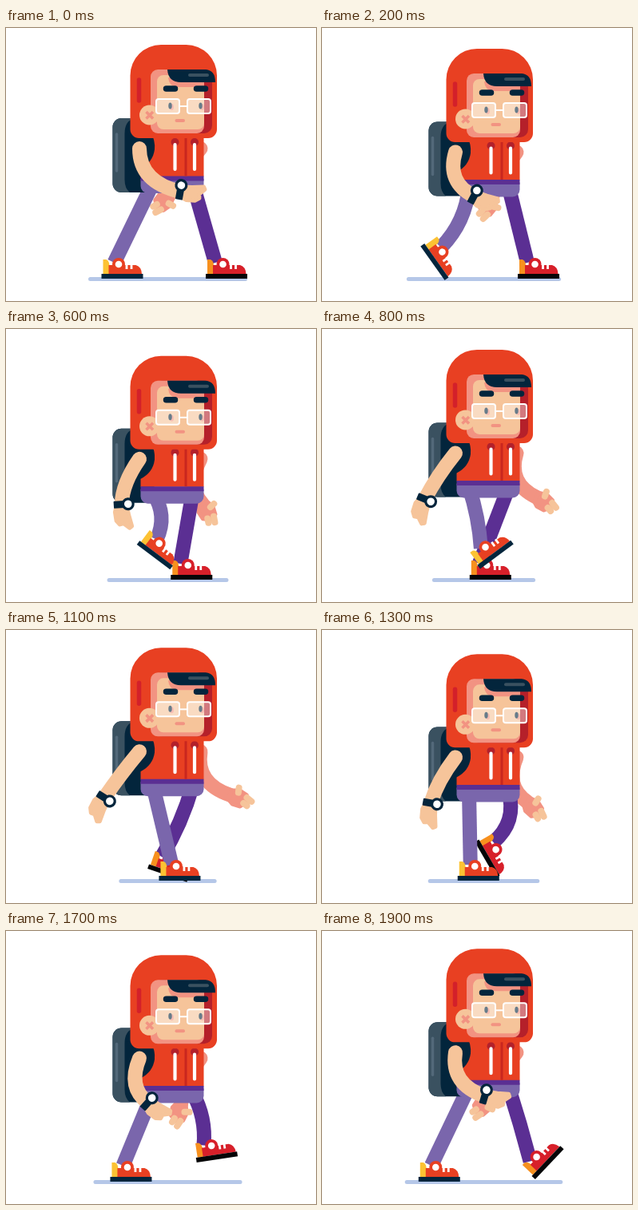
An HTML page for the animation above (2000 ms loop, 388 px wide and 342 px high).

```html
<!DOCTYPE html>
<html lang="en">
<head>
<meta charset="utf-8">
<title>Walk cycle</title>
<style>
  html, body { margin: 0; width: 100%; height: 100%; overflow: hidden; background: #fff; }
  svg { display: block; width: 100%; height: 100%; }
  .limb { fill: none; stroke-width: 18; }
  .round { stroke-linecap: round; stroke-linejoin: round; }
  .red { fill: #e84022; }
  .navy { fill: #03253c; }
  .slate { fill: #3a5160; }
  .skin { fill: #f6c49a; stroke: #f6c49a; }
  .blush { fill: #f29382; stroke: #f29382; }
  .flat { stroke: none; }
  .near { --upper: #e84022; --heel: #fcc233; --sole: #03253c; }
  .far { --upper: #d7202a; --heel: #f7901e; --sole: #050507; }
</style>
</head>
<body>
<svg viewBox="0 0 388 342">
  <defs>
    <g id="shoe">
      <path d="M2-6V-24H6Q10-22 10-16V-6Z" fill="var(--heel)"/>
      <path d="M9-6V-17H43Q50-15 50.500-6Z" fill="var(--upper)"/>
      <circle cx="21.500" cy="-18" r="8" fill="var(--upper)"/>
      <circle cx="21.500" cy="-18" r="4.300" fill="#fff"/>
      <path d="M31.500-18.500v6.500M37.500-18.500v6.500" stroke="#fff" stroke-width="2.800"/>
      <rect y="-6" width="52" height="6" fill="var(--sole)"/>
    </g>
  </defs>

  <line id="shadow" y1="314.500" y2="314.500" stroke="#b5c7e8" stroke-width="5" stroke-linecap="round"/>

  <path id="farArm" class="limb round" stroke="#f29382"/>
  <g id="farHand" stroke-width="5" class="round">
    <path class="blush" d="M0-6L10-9 20-6 22 3 16 10 6 10 0 6Z"/>
    <path class="skin" fill="none" d="M9-6L8-12M21-3L28 0M19 5L24 7" stroke-width="8"/>
  </g>

  <path id="farLeg" class="limb" stroke="#5b2f93"/>
  <use id="farShoe" class="far" href="#shoe"/>
  <path id="nearLeg" class="limb" stroke="#7a66ac"/>
  <use id="nearShoe" class="near" href="#shoe"/>

  <g id="body">
    <rect class="navy" x="133.500" y="113" width="52" height="93" rx="11"/>
    <path class="slate" d="M160 113Q148.500 117 148.500 132V190Q148.500 201 155 206H144.500A11 11 0 0 1 133.500 195V124A11 11 0 0 1 144.500 113Z"/>
    <path class="round" d="M138.500 133V179" stroke="#53697a" stroke-width="3.500"/>
    <path fill="#7a66ac" d="M168.500 189H247.500V198A9 9 0 0 1 238.500 207H177.500A9 9 0 0 1 168.500 198Z"/>
    <path class="red" d="M168.500 125H247.500V186H168.500Z"/>
    <path fill="#5b2f93" d="M168.500 185.500H247.500V191.500H168.500Z"/>
    <path d="M225 137V185.500" stroke="#c9261f" stroke-width="3"/>
    <g fill="#b3202b"><circle cx="211.500" cy="143" r="5"/><circle cx="236" cy="143" r="5"/></g>
    <path class="round" d="M211.500 146V177M236 146V177" stroke="#fff" stroke-width="4.200"/>
    <path class="navy" d="M150 130H181Q187 141 186 152Q184 168 168.500 176L150 180Z"/>
  </g>

  <g id="head">
    <path class="red" d="M155.500 59.500A38.500 38.500 0 0 1 194 21H225.500A38.500 38.500 0 0 1 264 59.500V127A11 11 0 0 1 253 138H166.500A11 11 0 0 1 155.500 127Z"/>
    <path class="round" d="M166.500 65V91" stroke="#d3202a" stroke-width="5.500"/>
    <rect x="185" y="52" width="73" height="80" rx="10" fill="#b5202a"/>
    <rect class="blush flat" x="181" y="52" width="67" height="80" rx="9"/>
    <rect class="skin flat" x="189" y="59" width="59" height="68" rx="8"/>
    <path class="blush flat" d="M203 62H248V74H214Q204 73 203 62Z"/>
    <path class="navy" d="M202 52H250Q262 53 262 68H219Q203 68 202 52Z"/>
    <path class="round" d="M230 59H252" stroke="#3a5160" stroke-width="4"/>
    <path class="round" d="M200.500 76H211.500M238.500 76H249.500" stroke="#03253c" stroke-width="7.500"/>
    <circle class="skin flat" cx="179.500" cy="109" r="12.500"/>
    <path d="M175.500 105l8.500 8.500m0-8.500l-8.500 8.500" stroke="#f29382" stroke-width="3.600"/>
    <g class="blush flat"><ellipse cx="207.500" cy="99" rx="2.500" ry="4"/><ellipse cx="245.500" cy="99" rx="2.500" ry="4"/></g>
    <g class="navy"><ellipse cx="205.500" cy="97.500" rx="2.200" ry="4"/><ellipse cx="243.500" cy="97.500" rx="2.200" ry="4"/></g>
    <g fill="#fff" fill-opacity=".4" stroke="#fff" stroke-width="2">
      <rect x="188" y="89" width="29" height="18" rx="3"/>
      <rect x="227" y="89" width="29" height="18" rx="3"/>
      <path d="M217 98H227"/>
    </g>
    <rect class="blush flat" x="211.500" y="114" width="12.500" height="4" rx="2"/>
  </g>

  <path id="nearArm" class="limb round" stroke="#f6c49a"/>
  <g id="nearHand">
    <path class="skin round" stroke-width="5" d="M0-6L14-8 28-11 30-8 24-1 25 4 20 8 9 9 0 6Z"/>
    <rect class="navy" x="-4.500" y="-9" width="9" height="19" rx="1"/>
    <circle class="navy" cy="-8" r="8"/>
    <circle cy="-8" r="4.800" fill="#fff"/>
  </g>
</svg>

<script>
const LOOP = 2000, STEP = 100, GROUND = 314;

// Front and back are the heel positions of a stride; lags shape its timing.
const LEGS = {
  near: { phase: .5, hip: 184, ankle: 16, front: 198, back: 119.5, lift: 62, kick: 84, stanceLag: .75, swingLag: 1.25 },
  far: { phase: 0, hip: 233.5, ankle: 12, front: 250, back: 175, lift: 53, kick: 67, stanceLag: 1.15, swingLag: 1 }
};
// Back is the wrist's rearmost offset from the shoulder.
const ARMS = {
  near: { phase: 0, shoulder: 167, back: -47, reach: 98 },
  far: { phase: .5, shoulder: 243.5, back: -39, reach: 89 }
};

const part = id => document.getElementById(id);
const mix = (a, b, u) => a + (b - a) * u;
const smooth = u => u * u * (3 - 2 * u);
// One hump over 0..1; a larger skew moves its peak later.
const hump = (u, skew) => Math.sin(Math.PI * u ** skew);

const place = (id, x, y, angle = 0) =>
  part(id).setAttribute('transform', `translate(${x} ${y}) rotate(${angle})`);
const curve = (id, x0, y0, x1, y1, x2, y2) =>
  part(id).setAttribute('d', `M${x0} ${y0}Q${x1} ${y1} ${x2} ${y2}`);

// Stance for half of the cycle, then a swing: toe kick, lift, heel strike.
function footPose(leg, cycle) {
  if (cycle < .5) {
    const slide = smooth((cycle * 2) ** leg.stanceLag);
    return { x: mix(leg.front, leg.back, slide), y: GROUND, angle: 0, bend: 0 };
  }
  const u = cycle * 2 - 1, raise = hump(u, .75) ** 2;
  return {
    x: mix(leg.back, leg.front, smooth(u ** leg.swingLag)) + 19 * hump(u, 7),
    y: GROUND - leg.lift * raise,
    angle: leg.kick * raise - 57 * hump(u, 4),
    bend: 23 * raise
  };
}

function drawLeg(side, cycle, sink) {
  const leg = LEGS[side], hipY = 194 + sink;
  const { x, y, angle, bend } = footPose(leg, (cycle + leg.phase) % 1);
  const r = angle * Math.PI / 180, cos = Math.cos(r), sin = Math.sin(r);
  const ankleX = x + leg.ankle * cos + 20 * sin, ankleY = y + leg.ankle * sin - 20 * cos;
  const dx = ankleX - leg.hip, dy = ankleY - hipY, len = Math.hypot(dx, dy);
  curve(side + 'Leg', leg.hip, hipY,
    leg.hip + dx / 2 + bend * dy / len, hipY + dy / 2 - bend * dx / len, ankleX, ankleY);
  place(side + 'Shoe', x, y, angle);
}

function drawArm(side, cycle, sink) {
  const { phase, shoulder, back, reach } = ARMS[side], y = 151 + sink;
  const forward = Math.abs(1 - 2 * ((cycle + phase) % 1)) ** 1.5;
  const wristX = shoulder + back + reach * forward, wristY = y + 58 - 4 * forward;
  curve(side + 'Arm', shoulder, y,
    shoulder - 23 * (1 - forward ** 2), y + 27 + 15 * forward, wristX, wristY);
  place(side + 'Hand', wristX, wristY, 10 + 118 * (1 - forward) ** 1.5);
}

function draw(cycle) {
  const turn = cycle * 2 * Math.PI;
  const dip = (1 - Math.cos(2 * turn)) / 2, sink = 13 * dip;
  const half = 78.5 + 19.8 * Math.cos(turn) - 1.3 * Math.cos(2 * turn);
  part('shadow').setAttribute('x1', 202.5 - half);
  part('shadow').setAttribute('x2', 202.5 + half);
  place('body', 0, sink);
  place('head', 0, 14.2 * dip);
  for (const side of ['near', 'far']) {
    drawLeg(side, cycle, sink);
    drawArm(side, cycle, sink);
  }
}

const start = performance.now();
function tick() {
  const t = (performance.now() - start) % LOOP;
  draw(Math.floor(t / STEP) * STEP / LOOP);
  requestAnimationFrame(tick);
}
tick();
</script>
</body>
</html>
```
